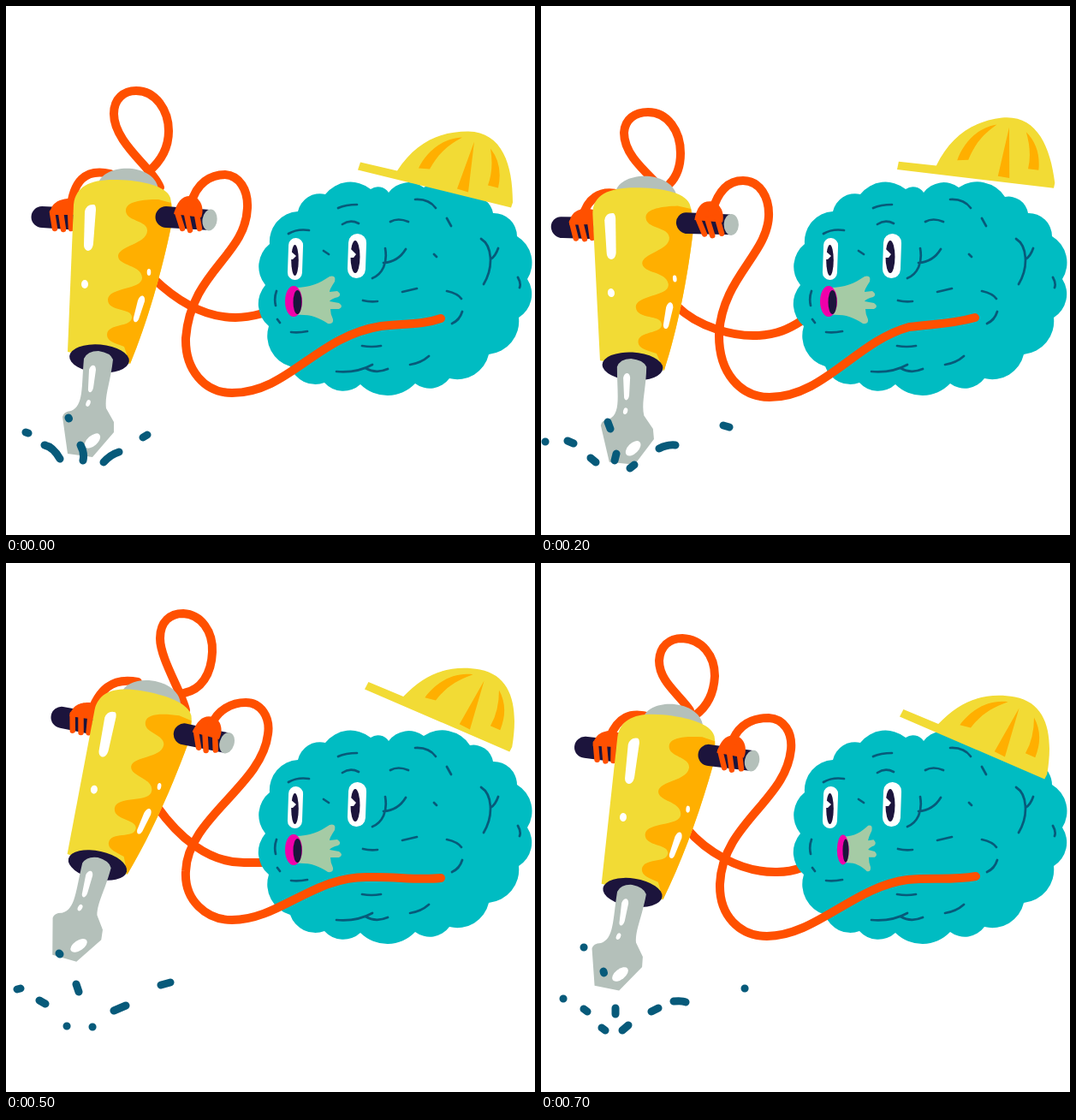
Animation, 618 px wide and 618 px high, one loop 0.8 s. Source, as an HTML page:

```html
<!DOCTYPE html>
<html lang="en">
<head>
<meta charset="utf-8">
<title>Drilling brain</title>
<style>
  html, body { margin: 0; width: 100%; height: 100%; overflow: hidden; background: #fff; }
  svg { display: block; width: 100%; height: 100%; }
  .cable { fill: none; stroke: #ff5000; stroke-width: 10; stroke-linecap: round; }
  .fold { fill: none; stroke: #075a7a; stroke-width: 2.7; stroke-linecap: round; }
  .chip { fill: none; stroke: #075a7a; stroke-width: 9; stroke-linecap: round; }
  .finger { fill: none; stroke: #ff5000; stroke-width: 6.5; stroke-linecap: round; }
  .navy { fill: #1c143c; }
  .yellow { fill: #f2db35; }
  .amber { fill: #ffaf00; }
  .steel { fill: #b4c0ba; }
  .white { fill: #fff; }
</style>
</head>
<body>
<svg viewBox="0 0 618 618">
  <path id="back" class="cable"/>
  <path id="left" class="cable"/>
  <path id="loop" class="cable"/>

  <g id="drill">
    <path class="steel" d="M107 210C111 183 173 182 178 214Z"/>
    <path class="navy" d="M42 234L86 236V262L42 259A12 12 0 0 1 42 234Z"/>
    <path fill="#ff5000" d="M51 244C52 230 62 226 72 225L84 228V244Z"/>
    <path class="finger" d="M54 241L57 260M64 241L67 261M75 241L76 260"/>
    <path class="yellow" d="M79 232C81 210 100 202 130 203C160 204 187 210 192 224Q196 240 193 257C182 310 165 370 145 418L72 404Z"/>
    <path class="amber" d="M178 226C160 226 140 228 140 239C140 252 166 250 165 263C164 278 132 280 131 292C131 304 158 302 159 317C160 332 120 328 119 343C119 358 148 352 147 364C146 376 119 370 118 384C118 392 128 394 138 398L145 418C165 370 182 310 193 257V230Z"/>
    <path class="white" d="M92 240Q94 231 103 232Q105 233 105 238L102 277C101 289 91 288 91 279Z"/>
    <ellipse class="white" cx="92" cy="325" rx="4" ry="5"/>
    <ellipse class="white" cx="167" cy="311" rx="2.3" ry="4"/>
    <path class="white" d="M154 344C157 336 163 337 162 345L155 366C152 372 148 369 149 364Z"/>
    <ellipse class="navy" cx="109" cy="412" rx="35" ry="16.500" transform="rotate(5 109 412)"/>
    <path class="steel" d="M91 412Q95 403 108 403Q122 405 125 413C122 440 115 455 117 470L126 486V498L101 527L72 523L66 480Q67 474 76 473C91 467 88 445 91 412Z"/>
    <path class="white" d="M97 425C99 418 105 418 105 425L102 446C100 454 95 452 96 446Z"/>
    <ellipse class="white" cx="96" cy="464" rx="2.5" ry="4" transform="rotate(20 96 464)"/>
    <ellipse class="white" cx="101" cy="508" rx="11" ry="6" transform="rotate(-42 101 508)"/>
    <path class="navy" d="M187 234L238 238V262L187 259A12 12 0 0 1 187 234Z"/>
    <ellipse class="steel" cx="238" cy="250" rx="8.5" ry="12.5" transform="rotate(8 238 250)"/>
    <path fill="#ff5000" d="M196 243C200 228 206 221 217 222C228 224 232 237 228 247Z"/>
    <path class="finger" d="M200 241L206 260M211 243L215 262M223 244L226 260"/>
  </g>

  <path id="chips" class="chip"/>

  <g id="brain">
    <path id="lobes" fill="#00bcc2"/>
    <path class="fold" d="M388 236Q397 232 410 232M330 266Q340 260 354 262M393 255Q402 249 412 254M449 252Q458 247 470 252M478 226Q494 225 502 236M515 248L520 257M371 286L377 290M500 290L503 293M443 283C446 300 440 313 428 318M441 300Q458 299 467 284M555 272C568 280 570 305 558 325M566 296Q572 292 575 283M598 317Q602 324 600 329M463 334L480 330M417 344Q425 346 434 345M515 333Q528 336 532 342M533 357Q530 367 521 371M316 333Q313 341 315 350M317 366L320 370M333 381Q342 382 352 380M416 397Q427 399 438 397M472 419Q485 417 494 409M386 427Q410 429 428 419M420 423Q432 430 446 424"/>
    <g id="open">
      <rect class="white" x="329.500" y="271" width="17" height="49" rx="8.500" transform="rotate(2 338 296)"/>
      <rect class="white" x="399.500" y="266" width="21" height="52" rx="10.500" transform="rotate(2 410 292)"/>
      <ellipse class="navy" cx="337.500" cy="297" rx="4.300" ry="18"/>
      <ellipse class="navy" cx="408" cy="293" rx="5.500" ry="19"/>
      <path class="white" d="M331 285L339 292L335 296L331 296ZM400 281L409 290L406 294L400 294Z"/>
    </g>
    <path id="shut" class="fold" style="stroke-width:3.500" d="M329 302Q340 296 352 299M331 292L336 299M344 290L342 297M335 300L334 303M394 296Q409 291 426 297M402 286L408 294M418 287L414 293"/>
    <g id="mouth">
      <path fill="#a5cba5" d="M338 329C355 329 366 324 378 316Q386 314 384 322Q378 331 378 334L387 333Q393 337 388 340Q380 342 378 345L389 347Q395 351 389 354L379 354Q379 360 382 366Q383 372 376 371C364 363 354 360 338 361Z"/>
      <ellipse fill="#f000aa" cx="336" cy="345" rx="10" ry="18"/>
      <ellipse class="navy" cx="340.500" cy="346" rx="5" ry="14"/>
    </g>
  </g>

  <g id="hat">
    <path class="yellow" d="M414 182L457 192C478 160 505 146 540 146C580 147 592 185 592 229L590 235L411 191Z"/>
    <path class="amber" d="M482 189C490 172 508 154 533 153C515 163 505 172 495 190ZM547 158L540 217L527 213ZM566 166Q581 185 575 212L563 209Q570 190 566 166Z"/>
  </g>
  <path id="arm" class="cable"/>
</svg>
<script>
const $ = id => document.getElementById(id);
const set = (id, name, value) => $(id).setAttribute(name, value);

// Valleys between the brain's lobes, clockwise
const valleys = [[308,278],[341,240],[373,220],[426,214],[447,218],[488,212],[542,223],
  [569,242],[597,269],[609,319],[599,364],[564,407],[518,435],[478,441],[414,442],[372,440],
  [332,421],[307,374],[303,326]];
let outline = 'M' + valleys[0];
valleys.forEach(([x, y], i) => {
  const [nx, ny] = valleys[(i + 1) % valleys.length];
  const r = Math.hypot(nx - x, ny - y) * 0.7;
  outline += `A${r} ${r} 0 0 1 ${nx} ${ny}`;
});
set('lobes', 'd', outline + 'Z');

// drill: linear part of its matrix, then where the collar centre sits
const poses = {
  down: {
    drill: [1, 0, 0, 1, 109, 412], lift: 0,
    back: 'M172 318C200 345 232 364 268 364C284 364 292 361 304 358',
    left: 'M75 240C78 205 92 189 122 196',
    loop: 'M180 212C172 190 126 160 126 126C126 108 138 99 152 99C175 99 190 122 190 146C190 168 178 184 166 194',
    arm: 'M216 232C222 206 240 197 256 197C272 198 283 214 282 236C280 292 216 310 210 388C209 425 232 452 264 452C330 452 362 386 438 374C468 371 488 372 508 365',
    chips: 'M23 498L26 499M45 513Q55 515 63 529M87 513Q92 522 90 531M114 533Q122 524 132 521M160 504L165 501M73 481L73.5 482'
  },
  upright: {
    drill: [1.008, -.034, .091, .995, 107, 421], lift: 0,
    back: 'M158 350C184 376 226 386 252 385C276 384 290 377 304 368',
    left: 'M48 248C54 225 68 214 92 220',
    loop: 'M138 210C118 190 97 172 97 148C98 132 110 124 125 124C148 124 163 146 163 172C163 190 158 200 150 208',
    arm: 'M200 240C208 212 222 204 236 204C256 204 267 224 266 246C264 290 212 318 208 382C207 430 234 457 267 457C330 457 368 392 430 375C460 371 478 372 507 364',
    chips: 'M5 509L5.1 509M31 508L38 511M58 528L64 533M78 486L81 494M88 523L86 531M104 540L109 536M138 517Q148 512 157 513M213 490L220 492'
  },
  high: {
    drill: [.988, .135, -.146, .989, 107, 353], lift: -10,
    back: 'M176 284C200 318 236 352 282 350L304 350',
    left: 'M98 178C108 148 124 133 154 139',
    loop: 'M210 172C206 152 180 112 180 88C180 68 192 59 207 59C228 60 242 80 241 104C240 130 228 148 208 152',
    arm: 'M240 190C246 172 264 163 280 163C298 163 309 180 306 200C299 260 212 298 210 360C208 394 234 417 264 417C320 417 360 364 426 367C454 366 480 371 508 368',
    chips: 'M13 498L17 497M39 511L46 515M82 492L85 501M62 456L63 457M71 541L71.1 541M101 542L101.1 542M126 523L140 517M181 493L192 490'
  },
  mid: {
    drill: [.9965, .0625, -.068, 1, 107, 385], lift: -10,
    back: 'M170 310C192 336 232 362 276 361C288 361 294 360 304 356',
    left: 'M80 204C90 180 104 173 128 180',
    loop: 'M174 172C160 152 138 138 138 114C139 97 150 88 165 88C188 89 203 108 203 132C202 152 194 168 180 178',
    arm: 'M222 212C230 188 248 181 266 181C284 182 294 198 292 218C286 278 212 304 209 375C208 412 232 436 264 436C320 436 366 378 428 370C458 367 480 371 508 366',
    chips: 'M50 449L50.1 449M26 509L26.1 509M50 521L54 524M87 520L87 527M73 477L73.5 479M71 543L75 546M95 546L102 540M129 524L137 520M155 512Q165 511 169 513M238 497L238.1 497'
  }
};

// Hat: brim tip x, y and turn in degrees
const hats = { down: [411, 191.5, 0], upright: [416, 191, -7], high: [419, 147.5, 9.5], mid: [419, 179.5, 9.5] };
const order = ['down', 'high', 'upright', 'high', 'down', 'high', 'upright', 'mid'];

function draw(now) {
  const step = Math.floor(now / 100) % order.length;
  const name = order[step], pose = poses[name], blink = step === 4;
  for (const id of ['back', 'left', 'loop', 'arm', 'chips']) set(id, 'd', pose[id]);
  set('drill', 'transform', `matrix(${pose.drill}) translate(-109 -412)`);
  set('brain', 'transform', `translate(0 ${pose.lift})`);
  const [x, y, turn] = hats[name];
  set('hat', 'transform', `translate(${x} ${y + (blink ? 10 : 0)}) rotate(${turn}) translate(-411 -191)`);
  set('open', 'visibility', blink ? 'hidden' : 'visible');
  set('shut', 'visibility', blink ? 'visible' : 'hidden');
  set('mouth', 'transform', name === 'mid' ? 'translate(392 345) scale(.7 .97) translate(-392 -345)' : '');
}

let start;
function tick(now) {
  start ??= now;
  draw(now - start);
  requestAnimationFrame(tick);
}
draw(0);
requestAnimationFrame(tick);
</script>
</body>
</html>
```
